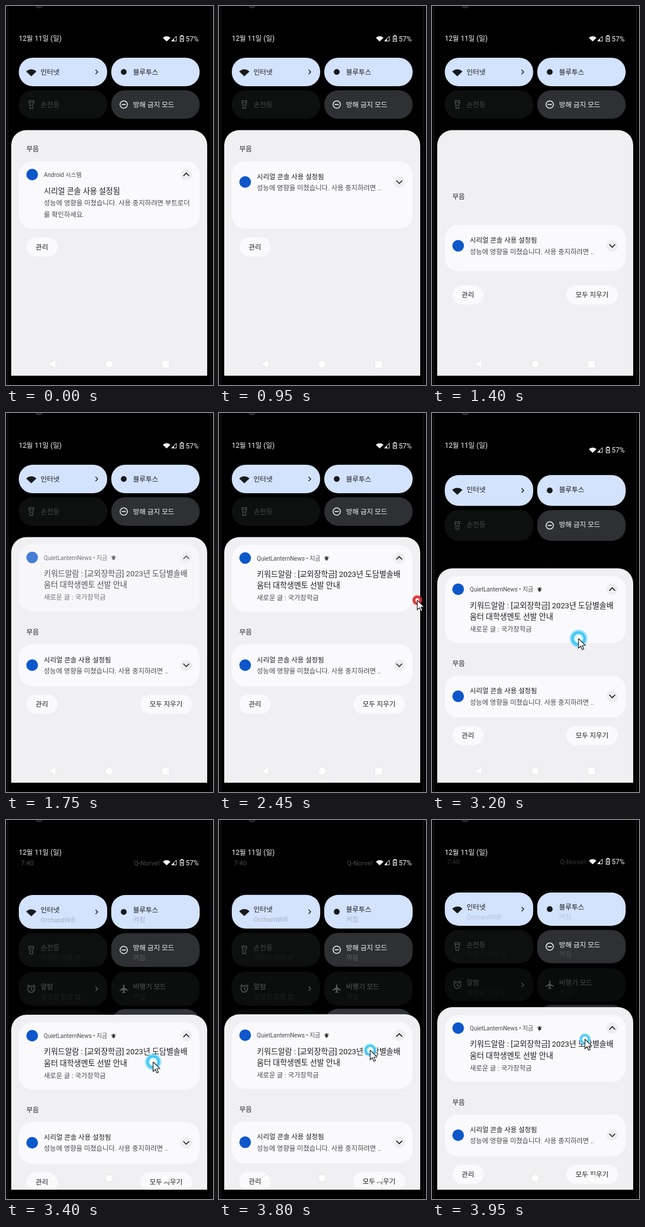
These frames come from a looping animation (356x652 px, 4000 ms). An HTML page with a canvas:

```html
<!DOCTYPE html>
<html lang="ko">
<head>
<meta charset="utf-8">
<title>알림 패널</title>
<style>
html, body { margin: 0; width: 100%; height: 100%; overflow: hidden; background: #000; }
canvas { display: block; width: 356px; height: 652px; }
</style>
</head>
<body>
<canvas id="stage"></canvas>
<script>
const W = 356, H = 652, LOOP = 4000, STEP = 50;
const FONT = 'Roboto, "Noto Sans CJK KR", "Noto Sans CJK", sans-serif';
const INK = '#1d1d1f', SOFT = '#48494c', CARD = '#fafafc', PANEL = '#f0f0f2', BLUE = '#0d57cb';
const ON = '#d3e2fd', OFF = '#2f3034', NONE = '#0e100f', DIM = '#484b49';

const canvas = document.getElementById('stage');
const c = canvas.getContext('2d');
const ratio = window.devicePixelRatio || 1;
canvas.width = W * ratio;
canvas.height = H * ratio;

const clamp = x => Math.max(0, Math.min(1, x));
const mix = (a, b, k) => a + (b - a) * k;
const ease = (t, from, to) => {
  const x = clamp((t - from) / (to - from));
  return x * x * (3 - 2 * x);
};

// Piecewise linear track: rows of [time, value, ...]
function track(rows, t, col = 1) {
  const i = rows.findIndex(r => r[0] > t);
  if (i === 0) return rows[0][col];
  if (i < 0) return rows[rows.length - 1][col];
  const a = rows[i - 1], b = rows[i];
  return mix(a[col], b[col], (t - a[0]) / (b[0] - a[0]));
}

const PULL = [[2950, 0], [3000, 2], [3050, 6.5], [3150, 34], [3300, 93], [3400, 121.5],
  [3500, 132], [3600, 134], [3700, 130], [3850, 116], [3950, 108.5]];
const POINTER = [[2450, 341, 322], [2500, 339, 328], [2600, 314, 318], [2750, 268, 303],
  [2850, 247, 297], [2950, 246, 300], [3000, 248, 328], [3050, 251, 358], [3200, 252, 388],
  [3400, 253, 416], [3600, 256, 419], [3800, 260, 396], [3950, 263, 377]];

function withAlpha(a, draw) {
  if (a <= 0) return;
  c.save();
  c.globalAlpha *= a;
  draw();
  c.restore();
}

function box(x, y, w, h, r, color) {
  c.fillStyle = color;
  c.beginPath();
  c.roundRect(x, y, w, h, r);
  c.fill();
}

function disc(x, y, r, color) {
  c.fillStyle = color;
  c.beginPath();
  c.arc(x, y, r, 0, 7);
  c.fill();
}

function ring(x, y, r, color, width) {
  c.strokeStyle = color;
  c.lineWidth = width;
  c.beginPath();
  c.arc(x, y, r, 0, 7);
  c.stroke();
}

function shape(points, color, x = 0, y = 0) {
  c.fillStyle = color;
  c.beginPath();
  points.forEach(p => c.lineTo(x + p[0], y + p[1]));
  c.closePath();
  c.fill();
}

function line(points, color, width, x = 0, y = 0) {
  c.strokeStyle = color;
  c.lineWidth = width;
  c.beginPath();
  points.forEach(p => c.lineTo(x + p[0], y + p[1]));
  c.stroke();
}

// y is the visual middle of the line
function text(str, x, y, size, color) {
  c.font = `${size}px ${FONT}`;
  c.fillStyle = color;
  c.fillText(str, x, y + size * 0.37);
}

function fan(x, y, r, color) {
  c.fillStyle = color;
  c.beginPath();
  c.moveTo(x, y);
  c.arc(x, y, r, -Math.PI * 0.76, -Math.PI * 0.24);
  c.fill();
}

const icons = {
  wifi: (x, y, col) => fan(x, y + 7.5, 12, col),
  dot: (x, y, col) => disc(x, y, 5, col),
  torch(x, y, col) {
    line([[-4, -6.5], [4, -6.5], [4, -2.5], [2.5, 0], [2.5, 6.5], [-2.5, 6.5], [-2.5, 0],
      [-4, -2.5], [-4, -7]], col, 1.4, x, y);
    line([[-4, -3.5], [4, -3.5]], col, 1.2, x, y);
    disc(x, y + 1, 1.1, col);
  },
  block(x, y, col) {
    ring(x, y, 6.3, col, 1.5);
    line([[-3.6, 0], [3.6, 0]], col, 1.7, x, y);
  },
  alarm(x, y, col) {
    ring(x, y + 0.5, 5.6, col, 1.4);
    line([[0, -2.8], [0, 1], [2.8, 2.6]], col, 1.2, x, y);
    line([[-7, -4], [-3.6, -7]], col, 1.4, x, y);
    line([[7, -4], [3.6, -7]], col, 1.4, x, y);
  },
  plane(x, y, col) {
    shape([[-1.2, -6.5], [0, -7.5], [1.2, -6.5], [1.2, -2], [7, 1.8], [7, 3.4], [1.2, 1.6],
      [1.2, 5], [2.8, 6.2], [2.8, 7.4], [0, 6.6], [-2.8, 7.4], [-2.8, 6.2], [-1.2, 5],
      [-1.2, 1.6], [-7, 3.4], [-7, 1.8], [-1.2, -2]], col, x, y);
  }
};

function tile(x, y, h, bg, ink, icon, label, sub, d, arrow) {
  const mid = y + h / 2;
  box(x, y, 152, h, 24, bg);
  icons[icon](x + 21.5, mid, ink);
  text(label, x + 37.5, mid - d * 0.032, 11.8, ink);
  withAlpha(clamp((d - 85) / 150), () => text(sub, x + 37.5, mid + 13.3, 11.5, ink));
  if (arrow) line([[-2, -3.7], [1.7, 0], [-2, 3.7]], ink, 1.4, x + 134, mid);
}

function quickTiles(d) {
  const h = 49 + d * 0.075;
  const y1 = 89 + d * 0.33, y2 = 145 + d * 0.408, y3 = 201 + d * 0.498, y4 = 257 + d * 0.562;
  tile(22, y1, h, ON, '#17191d', 'wifi', '인터넷', 'OrchardWifi', d, true);
  tile(181, y1, h, ON, '#17191d', 'dot', '블루투스', '켜짐', d);
  tile(22, y2, h, NONE, DIM, 'torch', '손전등', '카메라 사용 중', d);
  tile(181, y2, h, OFF, '#f1f1f3', 'block', '방해 금지 모드', '꺼짐', d);
  withAlpha(clamp((d - 50) / 100), () => {
    tile(22, y3, h, '#121413', '#777', 'alarm', '알람', '설정된 알람 없..', d, true);
    tile(181, y3, h, '#121413', '#777', 'plane', '비행기 모드', '꺼짐', d);
    box(22, y4, 152, h, 24, '#0c0d0d');
    box(181, y4, 152, h, 24, '#4a4b55');
  });
}

function statusBar(d) {
  const y = 56 + d * 0.14, white = '#f4f4f4';
  text('12월 11일 (일)', 22, 56, 11.9, white);
  withAlpha(clamp((d - 70) / 170), () => {
    text('7:40', 25.5, y + 0.5, 11.5, white);
    text('Q-Norvel', 220, y + 0.5, 11.5, white);
  });
  fan(276.3, y + 5, 9, white);
  line([[293, -4], [293, 4.3], [284.7, 4.3], [293, -4]], white, 1, 0, y);
  shape([[289, 0], [289, 4], [285, 4]], white, 0, y);
  line([[299.6, -4], [305.4, -4], [305.4, 5], [299.6, 5], [299.6, -4.5]], white, 1.2, 0, y);
  box(301, y - 5.8, 3, 2, 0, white);
  shape([[303, -2.5], [300.8, 1], [302.2, 1], [302, 4], [304.3, 0], [302.9, 0]], white, 0, y);
  text('57%', 309, y + 0.2, 12, white);
}

function toggle(y, up) {
  disc(310, y, 10, '#eeeef0');
  const s = up ? 1 : -1;
  line([[-5, 2.5 * s], [0, -2.5 * s], [5, 2.5 * s]], '#1a1a1c', 1.6, 310, y);
}

function bell(x, y) {
  shape([[-3, 2.5], [-2.3, 1.5], [-2.3, -1], [-1.2, -3], [0, -3.8], [1.2, -3], [2.3, -1],
    [2.3, 1.5], [3, 2.5]], '#333', x, y);
  disc(x, y + 3.2, 1, '#333');
  line([[-3.6, 0], [-3.1, -2.4], [-2, -3.6]], '#444', 0.8, x, y);
  line([[3.6, 0], [3.1, -2.4], [2, -3.6]], '#444', 0.8, x, y);
}

function newCard(y) {
  box(22, y, 311, 115, 23, CARD);
  disc(45, y + 22.5, 10, BLUE);
  text('QuietLanternNews • 지금', 65, y + 23, 10, SOFT);
  bell(185, y + 23);
  toggle(y + 22.5, true);
  text('키워드알람 : [교외장학금] 2023년 도담별솔배', 65, y + 50, 13.2, INK);
  text('움터 대학생멘토 선발 안내', 65, y + 69.5, 13.2, INK);
  text('새로운 글 : 국가장학금', 65, y + 91, 11.5, SOFT);
}

function systemCard(y, h, open) {
  box(22, y, 311, h, 23, CARD);
  const mid = y + (open ? 23 : 35.7);
  disc(45, mid, 10, BLUE);
  toggle(mid, open);
  if (open) {
    text('Android 시스템', 65, y + 23.5, 10, SOFT);
    text('시리얼 콘솔 사용 설정됨', 65, y + 51, 13.2, INK);
    text('성능에 영향을 미쳤습니다. 사용 중지하려면 부트로더', 65, y + 72, 11.55, SOFT);
    text('를 확인하세요.', 65, y + 92, 11.55, SOFT);
  } else {
    text('시리얼 콘솔 사용 설정됨', 65, y + 26.3, 11.65, INK);
    text('성능에 영향을 미쳤습니다. 사용 중지하려면 ..', 65, y + 45.7, 11.5, SOFT);
  }
}

function button(label, x, y, w) {
  box(x, y - 16.5, w, 33, 16.5, CARD);
  text(label, x + 16, y, 11.65, INK);
}

function panel(t, d) {
  c.save();
  c.beginPath();
  c.rect(9, 200, 337, 436);
  c.clip();
  box(9, 213.5 + d, 337, 500, 26, PANEL);
  c.translate(0, d);

  const move = ease(t, 950, 1554);
  const foot = mix(414.5, 501, ease(t, 950, 1467));
  const show = ease(t, 1430, 1900);
  withAlpha(show, () => newCard(mix(223, 227, show)));
  text('무음', 35, mix(246, 377, ease(t, 950, 1719)), 11.7, INK);
  systemCard(mix(267, 398, move), mix(116, 72, move), t < 950);
  button('관리', 35, foot, 54);
  withAlpha(ease(t, 950, 1250), () => button('모두 지우기', 231, foot, 89));
  c.restore();
}

function navBar() {
  c.save();
  c.shadowColor = 'rgba(0,0,0,.13)';
  c.shadowBlur = 2 * ratio;
  shape([[73, 616], [85, 609.5], [85, 622.5]], '#fff');
  disc(177.5, 616.3, 6, '#fff');
  box(268.5, 610.5, 12, 12, 1, '#fff');
  c.restore();
}

function halo(x, y, r, stops) {
  const g = c.createRadialGradient(x, y, 0, x, y, r);
  stops.forEach(s => g.addColorStop(s[0], s[1]));
  disc(x, y, r, g);
}

function pointer(t) {
  if (t < 2450) return;
  const x = track(POINTER, t), y = track(POINTER, t, 2);
  withAlpha(1 - clamp((t - 2450) / 200), () => halo(x, y, 9.5, [
    [0, '#fff'], [0.3, '#fbdcdc'], [0.48, '#e0262c'], [0.72, '#d8323a'], [1, 'rgba(220,50,60,0)']]));
  if (t >= 2800) {
    halo(x, y, t < 3050 ? 17.5 : mix(17.5, 11, Math.pow((t - 3050) / 900, 1.3)), [
      [0, '#fff'], [0.36, '#eefaff'], [0.5, '#5fd3f8'], [0.64, '#2fc2f4'],
      [0.8, 'rgba(70,200,245,.55)'], [1, 'rgba(90,210,250,0)']]);
  }
  const arrow = [[0, 0], [0, 16.5], [3.8, 13], [6.3, 19], [9, 17.9], [6.5, 12], [11.6, 11.7], [0, 0]];
  shape(arrow, '#fff', x, y);
  line(arrow, '#111', 1.1, x, y);
}

function phone() {
  c.fillStyle = '#000';
  c.fillRect(0, 0, W, H);
  box(2, 0, 2, H, 0, '#121314');
  box(351, 0, 2, H, 0, '#101112');
  disc(57, -3, 7, '#2b2c2e');
  disc(57, -3, 4.5, '#17181a');
}

function render(t) {
  c.setTransform(ratio, 0, 0, ratio, 0, 0);
  const d = track(PULL, t);
  phone();
  statusBar(d);
  quickTiles(d);
  panel(t, d);
  navBar();
  pointer(t);
}

const start = performance.now();
function tick() {
  const t = (performance.now() - start) % LOOP;
  render(Math.floor(t / STEP) * STEP);
  requestAnimationFrame(tick);
}
tick();
</script>
</body>
</html>
```
